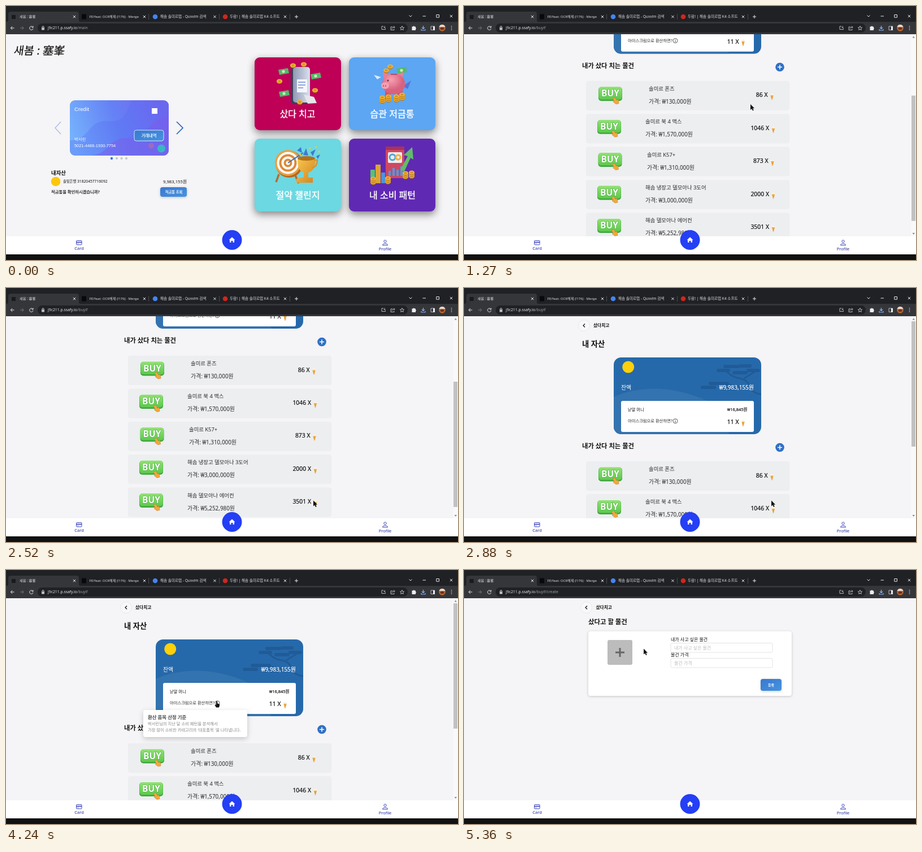
An HTML page that plays this animation: 800x450 px, repeating every 5390 ms.

```html
<!DOCTYPE html>
<html lang="ko">
<head>
<meta charset="utf-8">
<title>Savings app</title>
<style>
html, body { margin: 0; height: 100%; overflow: hidden; background: #000; }
svg { display: block; width: 100vw; height: 100vh; font: 7.3px "Noto Sans", "Noto Sans CJK KR", sans-serif; color: #111; fill: #111; }
text { white-space: pre; }
.b { font-weight: 700; }
.m { font-weight: 500; stroke: currentColor; stroke-width: .2; }
.l { font-weight: 300; fill: #2a2a2a; }
.w { fill: #fff; color: #fff; }
.mid { text-anchor: middle; }
.end { text-anchor: end; }
.arial { font-family: "Liberation Sans", Arial, sans-serif; }
.line { fill: none; stroke: #e8eaed; stroke-width: 1; }
.tile { filter: drop-shadow(0 5px 7px #0007); }
.soft { filter: drop-shadow(0 1px 2px #0003); }
.tile + text { font-size: 16px; font-weight: 500; fill: #fff; stroke: #fff; stroke-width: .4; text-anchor: middle; }
</style>
</head>
<body>
<svg viewBox="0 0 800 450">
<defs>
  <linearGradient id="card" x1="0" y1=".6" x2="1" y2=".4">
    <stop stop-color="#75b2fc"/><stop offset=".5" stop-color="#6581f5"/><stop offset="1" stop-color="#7565ed"/>
  </linearGradient>
  <linearGradient id="green" x2="0" y2="1"><stop stop-color="#92e273"/><stop offset="1" stop-color="#5cc94c"/></linearGradient>
  <linearGradient id="btn" x2="1" y2="1"><stop stop-color="#3978cf"/><stop offset="1" stop-color="#4594e0"/></linearGradient>
  <linearGradient id="gold" x2="1" y2="1"><stop stop-color="#f6c850"/><stop offset="1" stop-color="#d5821d"/></linearGradient>
  <linearGradient id="phone" x2="1"><stop stop-color="#8e99b4"/><stop offset="1" stop-color="#dbe1ee"/></linearGradient>
  <radialGradient id="pink" cx=".4" cy=".3"><stop stop-color="#f7a0b0"/><stop offset="1" stop-color="#d9627f"/></radialGradient>
  <clipPath id="cardClip"><rect x="113" y="167" width="175" height="98" rx="9"/></clipPath>
  <clipPath id="assetClip"><rect x="265" y="123" width="261" height="136" rx="13"/></clipPath>
  <clipPath id="tabClip"><path d="M0 0H237V28H0zM262 0H360V28H262zM386 0H486V28H386z"/></clipPath>
  <g id="close"><path class="line" d="M-2.2-2.2 2.2 2.2M2.2-2.2-2.2 2.2"/></g>
  <g id="coin"><ellipse rx="5" ry="4" fill="#b97817" cy="1"/><ellipse rx="5" ry="3.6" fill="#f0b838"/><ellipse rx="2.8" ry="1.9" fill="#d99424"/></g>
  <g id="stack"><use href="#coin" y="6"/><use href="#coin" y="3"/><use href="#coin"/></g>
  <g id="note"><path d="M-9-3 8-6 10 3-7 6z" fill="#55b96a"/><circle r="2.600" fill="#c9efbd"/></g>
  <g id="cone"><circle cy="-2.600" r="3" fill="#fbf1e3"/><path d="M-2.600-2H2.600L.5 6H-.5z" fill="#eea83e"/><path d="M-1.800 0 1 3M1.800 0-1 3" stroke="#d08528" stroke-width=".4"/></g>
  <g id="back"><circle r="10" fill="#f8f8fa" stroke="#e4e4e8" stroke-width=".8"/><path d="M1.500-3-1.500 0 1.500 3" class="line" style="stroke:#111;stroke-width:1.200"/></g>
  <g id="buyIcon">
    <rect x="-21" y="-12" width="42" height="24.500" rx="5" fill="#3fa63d"/>
    <rect x="-20.500" y="-12.500" width="41" height="22.500" rx="4.500" fill="url(#green)"/>
    <text class="b w mid" y="4.600" font-size="15.500" stroke="#45a53f" stroke-width="1" paint-order="stroke">BUY</text>
    <path d="M4 8 8 6 11 11 14 10 15 17 10 18 5 14 7 13z" fill="#f2a83b" stroke="#b9702a" stroke-width=".5"/>
  </g>
</defs>

<rect y="50" width="800" height="358" fill="#f5f4f6"/>

<g id="home">
  <text class="m" transform="translate(13 85.500) skewX(-8)" font-size="19.500">새봄 : 塞峯</text>

  <g clip-path="url(#cardClip)">
    <rect x="113" y="167" width="175" height="98" fill="url(#card)"/>
    <path d="M113 238C150 238 145 200 180 204S215 178 222 167H288V265H113z" fill="#536cf2" opacity=".3"/>
    <path d="M150 265C185 262 180 232 215 234S255 195 288 196V265z" fill="#7d5deb" opacity=".5"/>
  </g>
  <g class="w arial">
    <text x="121" y="186" font-size="9.700">Credit</text>
    <text x="121" y="239" font-size="7.400">박서린</text>
    <text x="121" y="250" font-size="7.400">5021-4486-1930-7754</text>
  </g>
  <rect x="258" y="181" width="10" height="10" fill="#fff"/>
  <rect x="227" y="220" width="52" height="19" rx="3.500" fill="url(#btn)" stroke="#d8e9fb"/>
  <text class="m w mid" x="253" y="232">거래내역</text>
  <circle cx="257" cy="247.500" r="5" fill="#c9708a" opacity=".5"/>
  <circle cx="275" cy="252.500" r="7" fill="#38b7c5"/>
  <g fill="#c2c4ca"><circle cx="187" cy="270" r="2.200" fill="#2f6ff0"/><circle cx="196" cy="270" r="2"/><circle cx="204.500" cy="270" r="2"/><circle cx="213" cy="270" r="2"/></g>
  <path d="M97 205 87 216 97 227" class="line" style="stroke:#aabfe9;stroke-width:1.500"/>
  <path d="M302 205 313 216 302 227" class="line" style="stroke:#2862c6;stroke-width:1.700"/>

  <text class="b" x="80" y="298.500" font-size="9.400">내자산</text>
  <circle cx="88" cy="311" r="8.300" fill="#fcc70b"/>
  <text x="101" y="313" font-size="6.300">솔빛은행</text>
  <text x="126" y="313" font-size="6.700">31820457716092</text>
  <text class="end" x="320" y="313.500" font-size="7.700">9,983,155원</text>
  <text class="m" x="80" y="332">적금통을 확인하시겠습니까?</text>
  <rect class="soft" x="273" y="321" width="47" height="17" rx="4" fill="url(#btn)"/>
  <text class="m w mid" x="297" y="332" font-size="6.300">적금통 조회</text>

  <rect class="tile" x="440" y="91" width="153" height="129" rx="9" fill="#be0057"/><text x="516" y="196.500">샀다 치고</text>
  <rect class="tile" x="607" y="91" width="153" height="129" rx="9" fill="#5ca6f3"/><text x="683.500" y="196.500">습관 저금통</text>
  <rect class="tile" x="440" y="235" width="153" height="129" rx="9" fill="#6cd8e1"/><text x="516.500" y="340.500">절약 챌린지</text>
  <rect class="tile" x="607" y="235" width="153" height="129" rx="9" fill="#6029b4"/><text x="684" y="340.500">내 소비 패턴</text>

  <!-- phone -->
  <use href="#note" x="491" y="116"/><use href="#note" x="492" y="155"/><use href="#note" x="548" y="124"/>
  <rect x="504" y="109" width="32" height="65" rx="6" fill="#3a4058"/>
  <rect x="508" y="108" width="30" height="63" rx="5" fill="url(#phone)"/>
  <path d="M515 130H533V153H515z" fill="#f4f6fb"/>
  <path d="M517 135H530M517 140H530M517 145H526" stroke="#6f8fd6" stroke-width="1.500"/>
  <path d="M527 157 545 161 550 172 534 173z" fill="#e6e6ea"/>
  <use href="#coin" x="508" y="105"/><use href="#coin" x="527" y="103"/><use href="#coin" x="484" y="133"/><use href="#coin" x="547" y="149"/><use href="#coin" x="520" y="170"/>

  <!-- piggy bank -->
  <use href="#note" x="700" y="114"/><path d="M651 122 664 126 657 130z" fill="#d9e8fc"/><path d="M702 142 717 132 711 147z" fill="#5577d8"/>
  <path d="M671 145H681V165H671zM692 145H702V164H692z" fill="#c95673"/>
  <path d="M668 128 667 116 680 123zM691 121 704 117 701 130z" fill="#e87f97"/>
  <ellipse cx="686" cy="138" rx="20.500" ry="18.500" fill="url(#pink)"/>
  <ellipse cx="671" cy="141" rx="7" ry="6" fill="#f4a0b2"/>
  <circle cx="676" cy="132" r="1.500" fill="#55324b"/>
  <path d="M668 140V143M672 140V143" stroke="#b5526f" stroke-width="1.500"/>
  <path d="M681 121H692" stroke="#a94a68" stroke-width="1.800"/>
  <use href="#coin" x="680" y="107"/><use href="#coin" x="673" y="114"/>
  <use href="#stack" x="677" y="160"/><use href="#stack" x="691" y="160"/><use href="#stack" x="701" y="157"/><use href="#stack" x="666" y="162"/>

  <!-- target and trophy -->
  <path d="M483 298 478 312M512 300 518 314" stroke="#b96a2a" stroke-width="3.500"/>
  <circle cx="501" cy="280" r="24" fill="#b9681f"/><circle cx="499" cy="278" r="23" fill="#e8a046"/>
  <circle cx="499" cy="278" r="19.500" fill="#fff"/><circle cx="499" cy="278" r="15.500" fill="#dc8a38"/>
  <circle cx="499" cy="278" r="11.500" fill="#fff"/><circle cx="499" cy="278" r="7.500" fill="#dc8a38"/><circle cx="499" cy="278" r="3.500" fill="#fff"/>
  <path d="M499 278 526 260" stroke="#3a6fc5" stroke-width="2"/>
  <path d="M516 270H547C548 286 543 293 535 295V304H543V313H514V306L527 303V295C518 292 516 284 516 270z" fill="url(#gold)"/>
  <ellipse cx="531.500" cy="270" rx="15.500" ry="4" fill="#b4701c"/>
  <path d="M545 273H551C551 283 546 286 542 287" fill="none" stroke="#d9932b" stroke-width="2.500"/>
  <path d="M515 256 522 250 524 260zM526 264 531 252 535 265zM539 259 548 254 543 266zM549 266 556 263 552 271z" fill="#3e7ad1"/>
  <path d="M519 263H522M536 252H539M547 250H550M553 258H556" stroke="#f0c83a" stroke-width="3"/>

  <!-- charts -->
  <rect x="672" y="249" width="33" height="56" rx="2" fill="#cf4862"/>
  <path d="M672 251V249H705V255H672z" fill="#a8335a"/>
  <rect x="676" y="259" width="25" height="19" rx="2" fill="#f3e9ef"/>
  <circle cx="684" cy="268" r="5" fill="none" stroke="#48a8cf" stroke-width="3"/><circle cx="694" cy="268" r="4" fill="none" stroke="#eeb238" stroke-width="3"/>
  <path d="M679 301V292M686 301V287M693 301V290M700 301V284" stroke="#4e9ae2" stroke-width="4"/>
  <path d="M698 290 711 266 704 264 719 250 721 272 716 269 705 293z" fill="#60bd68"/>
  <path d="M645 290H653V314H645z" fill="#5abf72"/><path d="M654 281H663V314H654z" fill="#dea435"/><path d="M664 295H671V314H664z" fill="#4d93df"/>
  <use href="#stack" x="650" y="306"/><use href="#stack" x="676" y="305"/><use href="#stack" x="707" y="296"/><use href="#stack" x="718" y="295"/>
</g>

<g id="buy">
  <g id="scroll">
    <use href="#back" x="212.500" y="66.500"/>
    <text class="b" x="229" y="69" font-size="7.700">샀다치고</text>
    <text class="b" x="209" y="104" font-size="13.300">내 자산</text>
    <g clip-path="url(#assetClip)">
      <rect x="265" y="123" width="261" height="136" fill="#2669aa"/>
      <path d="M265 193C310 173 370 172 430 200L470 259H265z" fill="#3a78b3" opacity=".7"/>
      <g fill="none" stroke="#1e5690" stroke-width="3" opacity=".7">
        <path d="M526 188C500 186 512 164 488 160S470 143 452 146M505 175C485 178 475 168 460 172M496 160 515 148"/>
        <path stroke-width="6" stroke-linecap="round" d="M450 146H468M462 139H485M478 150H499M503 146H521M422 176H443M436 169H466M458 178H480M490 138H506"/>
      </g>
    </g>
    <circle cx="290.700" cy="140" r="10.500" fill="#fdd00c"/>
    <text class="w" x="278" y="179.500" font-size="9.800">잔액</text>
    <text class="w m end" x="513" y="179.500" font-size="10">₩9,983,155원</text>
    <rect x="278" y="200" width="235" height="55" rx="3" fill="#fff"/>
    <text x="290" y="217.700">낟알 머니</text>
    <text class="m end" x="501.500" y="217.700" font-size="7.500">₩16,845원</text>
    <text class="l" x="290" y="238.200">아이스크림으로 환산하면?</text>
    <circle cx="374" cy="235.700" r="4" fill="none" stroke="#333" stroke-width=".8"/>
    <path d="M374 235V238.200M374 233.200V234" stroke="#333" stroke-width=".9"/>
    <text class="m end" x="486.500" y="241" font-size="10.400">11 X</text>
    <use href="#cone" x="494" y="239"/>
    <text class="b" x="209" y="284.300" font-size="11.300">내가 샀다 치는 물건</text>
    <circle cx="559" cy="282.500" r="7.800" fill="#2f70c5"/>
    <path d="M555 282.500H563M559 278.500V286.500" stroke="#fff" stroke-width="1.600"/>
    <g id="rows"></g>
  </g>
  <rect x="791.500" y="50" width="8.500" height="358" fill="#f9f9fa"/>
  <path d="M793.500 56.500 795.700 53.500 798 56.500zM793.500 402 795.700 405 798 402z" fill="#8b8b8b"/>
  <rect id="thumb" x="792" y="59" width="7" height="222" fill="#c1c1c2"/>
  <g id="tip">
    <rect x="243" y="248" width="184" height="48" rx="4" fill="#fff" style="filter:drop-shadow(0 3px 5px #0003)"/>
    <text class="m" x="251" y="263.500" font-size="8.400" fill="#333">환산 품목 산정 기준</text>
    <text x="251" y="275" fill="#888">박서린님의 지난 달 소비 패턴을 분석해서</text>
    <text x="251" y="286" fill="#888">가장 많이 소비한 카테고리의 '대표품목 '을 나타냅니다.</text>
  </g>
</g>

<g id="create">
  <use href="#back" x="216.500" y="66.500"/>
  <text class="b" x="233.500" y="69" font-size="7.700">샀다치고</text>
  <text class="b" x="220" y="96.300" font-size="11.400">샀다고 할 물건</text>
  <rect class="soft" x="220" y="108.500" width="360" height="114.500" rx="4" fill="#fff"/>
  <rect x="254" y="124" width="44" height="44" rx="3" fill="#bcbcbc"/>
  <path d="M268 146H284M276 138V154" stroke="#666" stroke-width="3"/>
  <g font-size="8">
    <text x="366" y="126">내가 사고 싶은 물건</text><text x="366" y="153.200">물건 가격</text>
    <g fill="#fff" stroke="#dcdce0" stroke-width=".8"><rect x="366" y="129.500" width="180" height="16.500" rx="2.500"/><rect x="366" y="156.500" width="180" height="16.500" rx="2.500"/></g>
    <g fill="#bdbdc1"><text x="372" y="140.600">내가 사고 싶은 물건</text><text x="372" y="167.600">물건 가격</text></g>
  </g>
  <rect class="soft" x="525" y="193" width="37" height="21" rx="4" fill="url(#btn)"/>
  <text class="b w mid" x="543.500" y="205.700" font-size="6">등록</text>
</g>

<!-- navigation bar -->
<rect y="408" width="800" height="32" fill="#fff"/>
<rect y="440" width="800" height="10"/>
<circle cx="400" cy="414.500" r="17.500" fill="#243ff5"/>
<path d="M394.500 414.500 400 409.500 405.500 414.500H404V419H401.500V416H398.500V419H396V414.500z" fill="#fff"/>
<g fill="none" stroke="#2a35b5" stroke-width=".9">
  <rect x="124.500" y="415.500" width="9.500" height="7.500" rx="1"/><path d="M124.500 418.500H134" stroke-width="1.500"/><path d="M126 421H128.500" stroke-width=".7"/>
  <circle cx="671" cy="417" r="2.200"/><path d="M666.700 424V423C666.700 420.500 675.300 420.500 675.300 423V424z"/>
</g>
<g class="mid" font-size="7.500" font-weight="500" fill="#1f2a9c"><text x="129.500" y="432">Card</text><text x="671" y="433">Profile</text></g>

<!-- browser -->
<rect width="800" height="28" fill="#202124"/>
<rect y="28" width="800" height="22" fill="#35363a"/>
<path d="M1 28Q4 28 4 25V14Q4 10 8 10H125Q129 10 129 14V25Q129 28 132 28z" fill="#35363a"/>
<path d="M252.500 14V24M377.500 14V24M502.500 14V24" stroke="#55575b" stroke-width=".8"/>
<rect x="10" y="16" width="7" height="7" fill="#191a1c"/><rect x="134" y="14.500" width="8" height="9" fill="#08090a"/>
<circle cx="264" cy="19" r="4.300" fill="#4285f4"/><circle cx="388" cy="19" r="4.300" fill="#d0271d"/>
<g fill="#dfe1e5" clip-path="url(#tabClip)">
  <text x="24" y="21.300" font-size="6.200">새봄 : 塞峯</text>
  <text x="147.500" y="21.300" font-size="6.100">FE/feat: OCR해제 (!176) · Merge</text>
  <text x="273" y="21.300" font-size="6.600">해솜 솔미르탭 - Quvvim 검색</text>
  <text x="396" y="21.300" font-size="6.600">두람! | 해솜 솔미르탭 K4 소프트</text>
</g>
<use href="#close" x="121" y="19"/><use href="#close" x="245" y="19"/><use href="#close" x="369.500" y="19"/><use href="#close" x="494" y="19"/><use href="#close" x="788" y="18"/>
<path class="line" d="M511 19H517M514 16V22M713.500 16.500 716 19 718.500 16.500M737.500 18H743M761.800 15.500H766.500V20.200H761.800z"/>
<rect x="56" y="31" width="655" height="16" rx="8" fill="#202124"/>
<path class="line" d="M14.500 39H8.500M11.300 36 8.300 39 11.300 42M47.600 37.500A3.200 3.200 0 1 0 48 40M48 35.500V38H45.500"/>
<path class="line" d="M25 39H31M28.300 36 31.300 39 28.300 42" style="stroke:#75777b"/>
<path d="M63 38.300H68V42.500H63z" fill="#bdc1c6"/><path class="line" d="M64 38.500V37.300A1.500 1.500 0 0 1 67 37.300V38.500" stroke-width=".8"/>
<text x="74" y="41.300" font-size="6.800" fill="#e8eaed">j9c211.p.ssafy.io<tspan id="path" fill="#9aa0a6"></tspan></text>
<g class="line" style="stroke:#c6c9ce;stroke-width:.9">
  <path d="M668 36H665V41.500H671.500V39.500M670 35.500V38.500M668.500 37.500 670 39 671.500 37.500M684 37H681V42.500H687V40.500M683 40.500C683 38 685 37.500 688 37.500M686 35.500 688 37.500 686 39.500"/>
  <path d="M701 35.500 702 38 704.700 38.200 702.600 40 703.300 42.500 701 41.200 698.700 42.500 699.400 40 697.300 38.200 700 38z"/>
  <path d="M752 36H758.500V42.500H752z"/>
</g>
<path d="M718.500 36.500H720.500A1.300 1.300 0 0 1 723 36.500H725V38.500A1.300 1.300 0 0 1 725 41V43H718.500z" fill="#eceef1"/>
<path d="M756 36H759V43H756z" fill="#eceef1"/>
<path class="line" d="M738.500 35V40M736 38 738.500 40.500 741 38M735 41V43H742V41" style="stroke:#8ab4f8;stroke-width:1.200"/>
<circle cx="772" cy="39" r="5.800" fill="#b96831"/><path d="M766.500 37A5.800 5.800 0 0 1 777.500 37z" fill="#ead9c9"/><ellipse cx="772" cy="40" rx="3.500" ry="2" fill="#6e2d1a"/>
<g fill="#e8eaed"><circle cx="788.500" cy="36" r=".8"/><circle cx="788.500" cy="39" r=".8"/><circle cx="788.500" cy="42" r=".8"/></g>

<g id="cursor">
  <path id="arrow" d="M0 0V10L2.300 8 4 11.500 5.700 10.700 4.100 7.300H7z"/>
  <path id="hand" d="M-1 0Q0-1.500 1 0V3.500L4.500 4.500Q5.500 5 5 7L4 10.500H-1L-3.500 6.500Q-3.500 5-1 6.500z"/>
</g>
</svg>

<script>
const $ = id => document.getElementById(id);
const LOOP = 5390, MAX_SCROLL = 187, BUY_AT = 300, CREATE_AT = 4830;

// name, price, count, name x, icon centre x, count right edge, cone x
const items = [
  ["솔미르 폰즈", "130,000", 86, 327, 259, 537.5, 545],
  ["솔미르 북 4 맥스", "1,570,000", 1046, 321, 257, 540, 547.5],
  ["솔미르 K57+", "1,310,000", 873, 324, 258.5, 538.5, 546],
  ["해솜 냉장고 델모아나 3도어", "3,000,000", 2000, 321, 257, 540, 547.5],
  ["해솜 델모아나 에어컨", "5,252,980", 3501, 321, 257, 540, 547.5]
];
$("rows").innerHTML = items.map(([name, price, count, x, icon, right, cone], i) => `
  <g transform="translate(0 ${307 + 58.4 * i})">
    <rect x="216" width="360" height="52" rx="4" fill="#eceef0"/>
    <use href="#buyIcon" x="${icon}" y="23"/>
    <text class="l" x="${x}" y="17" font-size="9.400">${name}</text>
    <text class="l" x="${x}" y="40" font-size="9.900">가격: ₩${price}원</text>
    <text class="m end" x="${right}" y="28.700" font-size="10.400">${count} X</text>
    <use href="#cone" x="${cone}" y="27.500"/>
  </g>`).join("");

const clamp = v => Math.min(1, Math.max(0, v));
const progress = (t, a, b) => clamp((t - a) / (b - a));
const smooth = p => p * p * (3 - 2 * p);
const show = (id, on) => $(id).style.display = on ? "" : "none";

// time, x, y
const route = [
  [0, 516, 149.5], [800, 516, 149.5], [1200, 507, 174], [1600, 507, 174], [2400, 544, 376.5],
  [2950, 544, 376.5], [3550, 373, 233], [4300, 373, 233], [4680, 559, 281], [4900, 559, 281],
  [5330, 318, 139.5], [LOOP, 318, 139.5]
];
function cursorAt(t) {
  const i = route.findIndex(k => k[0] > t);
  const [a, x, y] = route[i - 1], [b, u, v] = route[i];
  const p = smooth(progress(t, a, b));
  return [x + (u - x) * p, y + (v - y) * p];
}

function draw() {
  const t = performance.now() % LOOP;
  const page = t < BUY_AT ? "home" : t < CREATE_AT ? "buy" : "create";
  for (const id of ["home", "buy", "create"]) show(id, id === page);
  $("path").textContent = { home: "/main", buy: "/buyif", create: "/buyif/create" }[page];

  const down = 1 - (1 - progress(t, 850, 1420)) ** 2;
  const scroll = MAX_SCROLL * (down - smooth(progress(t, 2540, 2800)));
  $("scroll").setAttribute("transform", `translate(0 ${-scroll})`);
  $("thumb").setAttribute("y", 59 + scroll * 107 / MAX_SCROLL);

  $("tip").style.opacity = progress(t, 3560, 3680) - progress(t, 4340, 4440);

  const pointing = t > 3530 && t < 4330 || t > 4650 && t < CREATE_AT;
  show("cursor", page !== "home");
  show("hand", pointing);
  show("arrow", !pointing);
  $("cursor").setAttribute("transform", `translate(${cursorAt(t)})`);
  requestAnimationFrame(draw);
}
requestAnimationFrame(draw);
</script>
</body>
</html>
```
